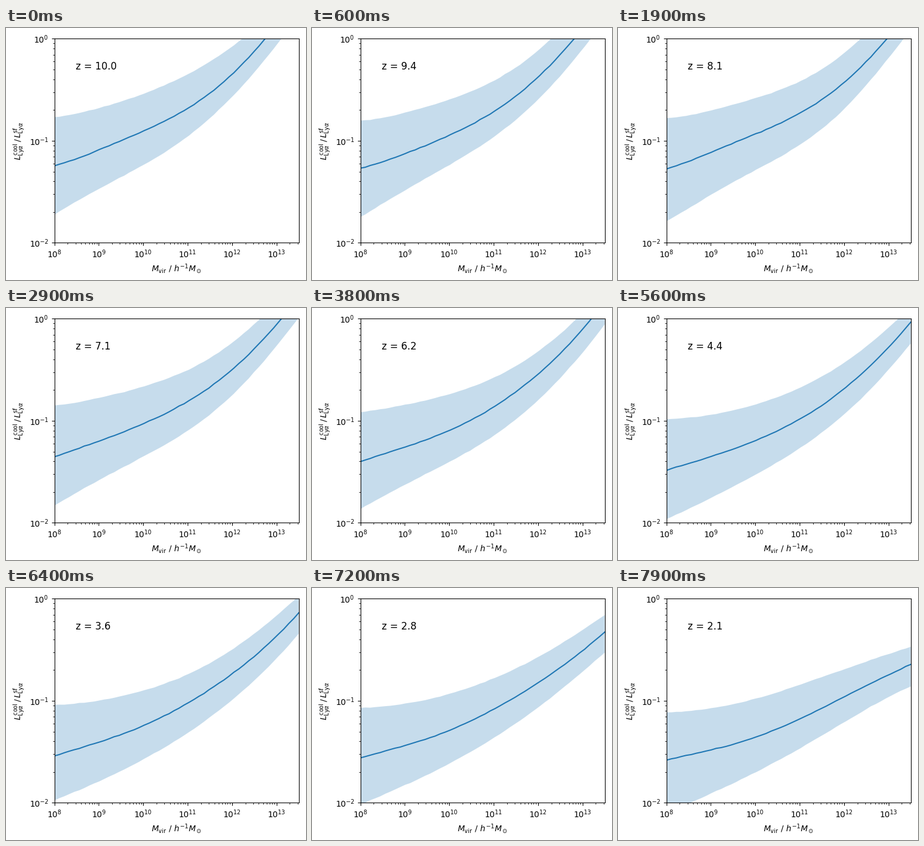
A matplotlib script that plays this animation: 512x431 px, repeating every 8000 ms.

```python
import numpy as np
import matplotlib.pyplot as plt
from matplotlib.animation import FuncAnimation

W, H = 512, 431
FRAMES, STEP = 80, 100

# Redshift -> upper, median, lower ratio (in -dex/1000) at the node masses.
NODES = np.array([8, 8.5, 10, 11.5, 13, 13.5])
KEYS = {
    10.0: [[768, 734, 539, 224, -287, -481],
           [1244, 1175, 905, 533, -138, -418],
           [1725, 1593, 1238, 779, 63, -218]],
    9.4: [[802, 774, 596, 281, -321, -562],
          [1269, 1206, 946, 562, -97, -361],
          [1748, 1616, 1238, 794, 103, -178]],
    8.1: [[777, 751, 582, 298, -275, -504],
          [1275, 1201, 934, 596, -17, -281],
          [1788, 1662, 1289, 883, 189, -86]],
    6.2: [[914, 883, 739, 464, -57, -287],
          [1401, 1327, 1095, 716, 103, -172],
          [1863, 1742, 1404, 986, 332, 57]],
    5.2: [[923, 911, 779, 499, 6, -206],
          [1430, 1364, 1146, 808, 195, -69],
          [1937, 1828, 1473, 1055, 401, 126]],
    3.6: [[1040, 1026, 900, 630, 166, -29],
          [1542, 1473, 1244, 888, 367, 138],
          [1977, 1886, 1576, 1163, 585, 344]],
    2.1: [[1112, 1100, 980, 768, 542, 470],
          [1582, 1530, 1358, 1072, 745, 642],
          [2103, 2006, 1702, 1341, 963, 860]],
}
STOPS = list(KEYS)

log_m = np.linspace(8, 13.5, 50)
mass = 10 ** log_m
MID = 10.75


def smooth(values):
    coef = np.polyfit(NODES - MID, -np.array(values) / 1000, len(NODES) - 1)
    return np.polyval(coef, log_m - MID)


CURVES = [np.array([smooth(row) for row in KEYS[z]]) for z in STOPS]


def curves_at(i):
    z = 10 - 0.1 * i
    k = next(n for n in range(len(STOPS) - 1) if z >= STOPS[n + 1] - 1e-6)
    w = (STOPS[k] - z) / (STOPS[k] - STOPS[k + 1])
    drift = 4 * w * (1 - w)
    if k == len(STOPS) - 2:
        w = max(w, 0) ** 1.6
    logs = (1 - w) * CURVES[k] + w * CURVES[k + 1]
    # sampling scatter
    rng = np.random.default_rng(100 + i)
    logs = logs + 0.006 * drift * rng.normal(size=(3, 1))
    logs += 0.0015 * rng.normal(size=logs.shape)
    return z, 10 ** logs


# the small margin keeps the pixel size from rounding down
fig = plt.figure(figsize=((W + 0.01) / 100, (H + 0.01) / 100), dpi=100)
left, right, top, bottom = 82.5, 499.5, 18.5, 367.5
ax = fig.add_axes([left / W, 1 - bottom / H, (right - left) / W, (bottom - top) / H])
ax.set(xscale="log", yscale="log", xlim=(1e8, 10 ** 13.5), ylim=(1e-2, 1))
ax.set_xlabel(r"$M_\mathrm{vir}\ /\ h^{-1} M_\odot$")
ax.set_ylabel(r"$L_{\mathrm{Ly}\alpha}^\mathrm{cool}\,/\,L_{\mathrm{Ly}\alpha}^\mathrm{sf}$")

band, = ax.fill([1e8, 1e9, 1e9], [0.1, 0.1, 0.2], color="C0", alpha=0.25, lw=0)
line, = ax.plot([], [], color="C0", lw=1.5)
label = ax.text(3e8, 0.5, "", fontsize=12)


def update(i):
    z, (high, median, low) = curves_at(i)
    band.set_xy(np.column_stack([np.r_[mass, mass[::-1]], np.r_[high, low[::-1]]]))
    line.set_data(mass, median)
    label.set_text(f"z = {z:.1f}")
    return band, line, label


anim = FuncAnimation(fig, update, frames=FRAMES, interval=STEP, repeat=True, repeat_delay=0)
plt.show()
```
